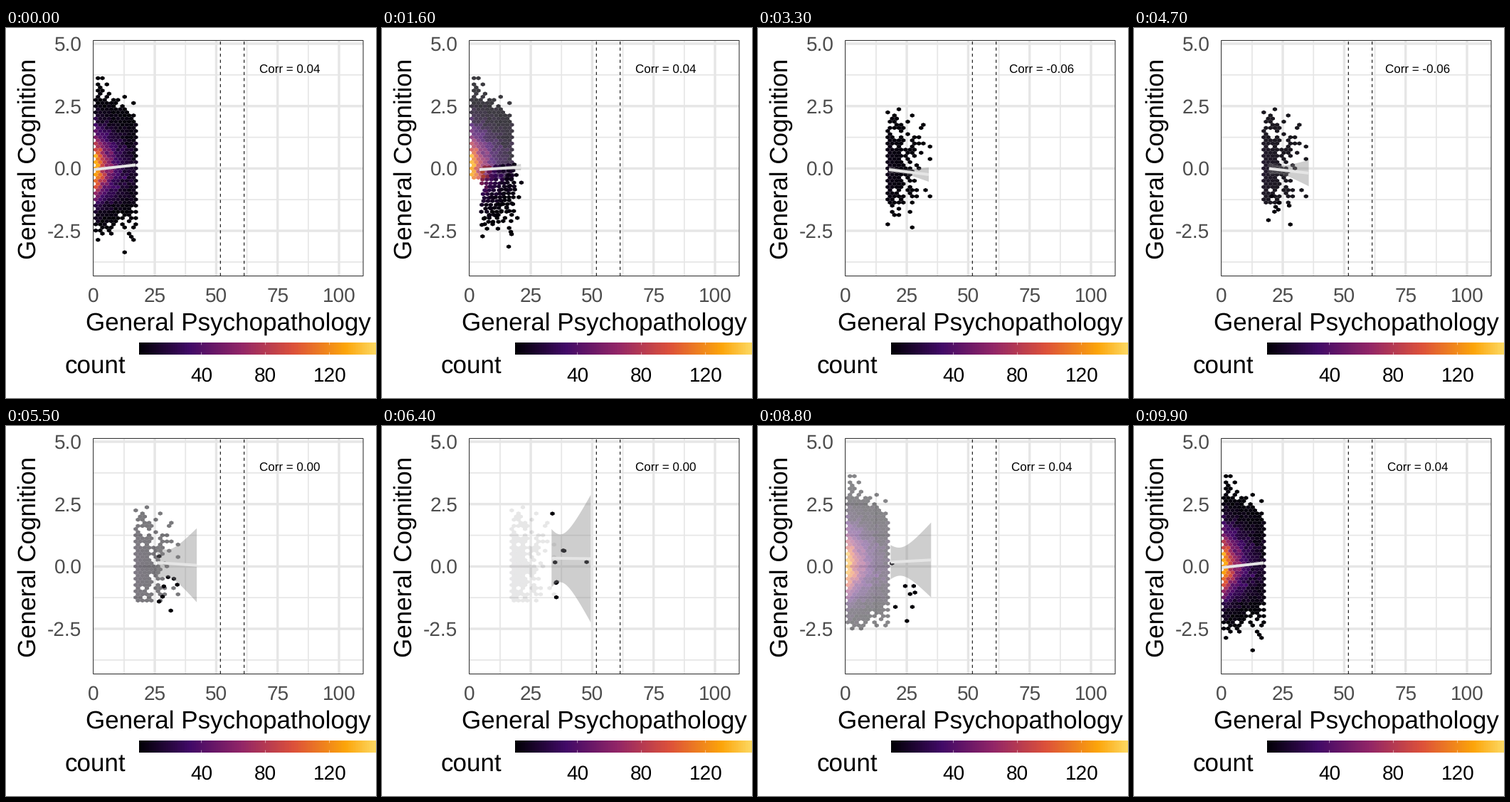
Animation of 520x520 px, one loop 10 s. Source, as a matplotlib script:

```python
import numpy as np
import matplotlib.pyplot as plt
from matplotlib.animation import FuncAnimation
from matplotlib.collections import PolyCollection
from matplotlib.colors import LinearSegmentedColormap
from matplotlib.patches import Polygon, Rectangle

DPI, SIZE = 100, 520
LEFT, RIGHT, TOP, BOTTOM = 122.6, 502, 17.5, 348.5
PX = 72 / DPI
MAX_COUNT = 163
HEAT = LinearSegmentedColormap.from_list(
    "heat", ["#000004", "#420A68", "#932667", "#DD513A", "#FCA50A", "#FCFFA4"])

plt.rcParams["font.family"] = "Liberation Sans"
plt.rcParams["text.hinting"] = "none"
plt.rcParams["path.snap"] = False

fig = plt.figure(figsize=(SIZE / DPI, SIZE / DPI), dpi=DPI, facecolor="white")
ax = fig.add_axes([0, 0, 1, 1])
rng = np.random.default_rng(7)


def data_x(v):
    return 122.8 + 3.452 * v


def data_y(v):
    return 197.4 - 35.06 * v


# Hexagon cells: column pitch, row pitch and outline around a centre.
DX, DY = 6.25, 4.37
ANGLES = np.radians(np.arange(30, 390, 60))
HEX = np.column_stack([DX / np.sqrt(3) * np.cos(ANGLES), DY * 2 / 3 * np.sin(ANGLES)])


def cells(first, last):
    """Columns and rows, bottom row first; even rows sit half a column over."""
    grid = [(c + (r % 2 == 0) / 2, r) for r in range(60, -5, -1) for c in range(20)]
    return np.array([g for g in grid if first <= g[0] <= last]).T


def density(c, r, peak, first, decay, mid, up, down):
    """Exponential to the right, two-sided bell from top to bottom."""
    spread = np.where(r < mid, up, down)
    return peak * np.exp(-(c - first) / decay - ((r - mid) / spread) ** 2 / 2)


def band(x0, x1, y0, y1, mid, waist, slope):
    """Fit line with its confidence band: columns x, upper, line, lower."""
    x = np.linspace(x0, x1, 80)
    y = np.linspace(y0, y1, 80)
    half = np.hypot(waist, slope * (x - mid))
    return np.column_stack([x, y - half, y, y + half])


def state(c, r, count, fit_band, corr):
    pts = np.column_stack([123 + DX * c, 57.4 + DY * r])
    rgb = HEAT(np.clip(count, 1, MAX_COUNT) / MAX_COUNT)[:, :3]
    return pts, rgb, fit_band, f"Corr = {corr}"


def low_state():
    c, r = cells(0.5, 9.5)
    count = rng.poisson(density(c, r, 165, 0, 3.5, 31.8, 7.6, 6.6))
    keep = count > 0
    return state(c[keep], r[keep], count[keep],
                 band(123, 182, 199, 192.5, 140, 1, 0.06), "0.04")


def mid_state(total):
    c, r = cells(9.5, 19)
    rate = density(c, r, 6, 9.5, 2.7, 32, 7.5, 7.5)
    keep = np.sort(np.argsort(rng.exponential(size=len(c)) / rate)[:total])
    return state(c[keep], r[keep], 1 + rate[keep],
                 band(184, 240, 199, 206, 200, 3, 0.24), "-0.06")


def high_state():
    c, r = np.array([(20, 41), (20.5, 36), (20.5, 36), (20, 29), (28, 29),
                     (22, 25), (22, 25), (19.5, 12)]).T
    return state(c, r, np.ones(len(c)),
                 band(244, 299, 184.4, 184.4, 256, 36.8, 2.115), "0.00")


low = low_state()
mid = mid_state(np.sum(low[0][:, 1] > 213))
high = high_state()
STAGES = [(11, 33, low, mid), (45, 66, mid, high), (78, 99, high, low)]


# Panel
def label(x, y, text, px, color="black", **kw):
    kw = {"ha": "center", "va": "baseline", **kw}
    return ax.text(x, y, text, fontsize=px * PX, color=color, **kw)


def grid_lines(xs, ys, width):
    style = dict(color="#E6E6E6", lw=width * PX, solid_capstyle="butt", zorder=1)
    for x in xs:
        ax.plot([data_x(x)] * 2, [TOP, BOTTOM], **style)
    for y in ys:
        ax.plot([LEFT, RIGHT], [data_y(y)] * 2, **style)


x_ticks = np.arange(0, 101, 25)
y_ticks = np.arange(-2.5, 5.1, 2.5)
grid_lines(x_ticks[:-1] + 12.5, y_ticks - 1.25, 1.7)
grid_lines(x_ticks[1:], y_ticks, 3.4)
for x in (301.3, 334.7):
    ax.plot([x, x], [BOTTOM, TOP], color="black", lw=1.07 * PX,
            dashes=(4, 4), dash_capstyle="butt", zorder=2)

panel = Rectangle((LEFT, TOP), RIGHT - LEFT, BOTTOM - TOP, fill=False,
                  ec="#333333", lw=1.07 * PX, zorder=8)
ax.add_patch(panel)

for v in x_ticks:
    label(data_x(v), 385, str(v), 28, "#4D4D4D")
for v in y_ticks:
    label(106.5, data_y(v) + 9.6, f"{v:.1f}", 28, "#4D4D4D", ha="right")
label(312.5, 425, "General Psychopathology", 35)
label(42, 184, "General Cognition", 35, rotation=90, rotation_mode="anchor")

# Colour bar
ax.imshow(np.linspace(1 / MAX_COUNT, 1, 365)[None, :], cmap=HEAT, vmin=0, vmax=1,
          extent=(187, 551.5, 459, 442), aspect="auto", interpolation="bilinear")
label(83, 485, "count", 35, ha="left")
for v in (40, 80, 120):
    x = 184.8 + 2.25 * v
    label(x, 497, str(v), 28)
    for y in (442, 455.6):
        ax.plot([x, x], [y, y + 3.4], color="white", lw=0.5 * PX, solid_capstyle="butt")

# Moving parts
hexes = PolyCollection([], linewidths=0, antialiaseds=True, zorder=3)
ax.add_collection(hexes, autolim=False)
ribbon = Polygon([(0, 0), (1, 0), (1, 1)], fc=(0.52, 0.52, 0.52, 0.4), lw=0, zorder=4)
ax.add_patch(ribbon)
fit, = ax.plot([], [], color="#E5E5E5", lw=4 * PX, solid_capstyle="butt", zorder=5)
for part in (hexes, ribbon, fit):
    part.set_clip_path(panel)
corr = label(398.5, 64, "", 17, zorder=9)

ax.set_xlim(0, SIZE)
ax.set_ylim(SIZE, 0)
ax.axis("off")


def mix(a, b, p):
    return a + (b - a) * p


def draw(k):
    start, end, a, b = [s for s in STAGES if k >= s[0] or s is STAGES[0]][-1]
    p = min(max((k - start) / (end - start), 0), 1)
    n = min(len(a[0]), len(b[0]))

    # Unmatched cells fade in place beneath the travelling ones.
    groups = [(a[0][n:], a[1][n:], 1 - p), (b[0][n:], b[1][n:], p),
              (mix(a[0][:n], b[0][:n], p), mix(a[1][:n], b[1][:n], p), 1)]
    groups = [g for g in groups if g[2] > 0 and len(g[0])]
    pts = np.vstack([g[0] for g in groups])
    rgba = np.vstack([np.column_stack([g[1], np.full(len(g[1]), g[2])]) for g in groups])
    hexes.set_verts(pts[:, None, :] + HEX[None, :, :])
    hexes.set_facecolor(rgba)

    x, upper, line, lower = mix(a[2], b[2], p).T
    ribbon.set_xy(np.column_stack([np.r_[x, x[::-1]], np.r_[upper, lower[::-1]]]))
    fit.set_data(x, line)
    corr.set_text((b if p > 0.47 else a)[3])
    return hexes, ribbon, fit, corr


anim = FuncAnimation(fig, draw, frames=100, interval=100, repeat=True,
                     repeat_delay=0, blit=False)
plt.show()
```
